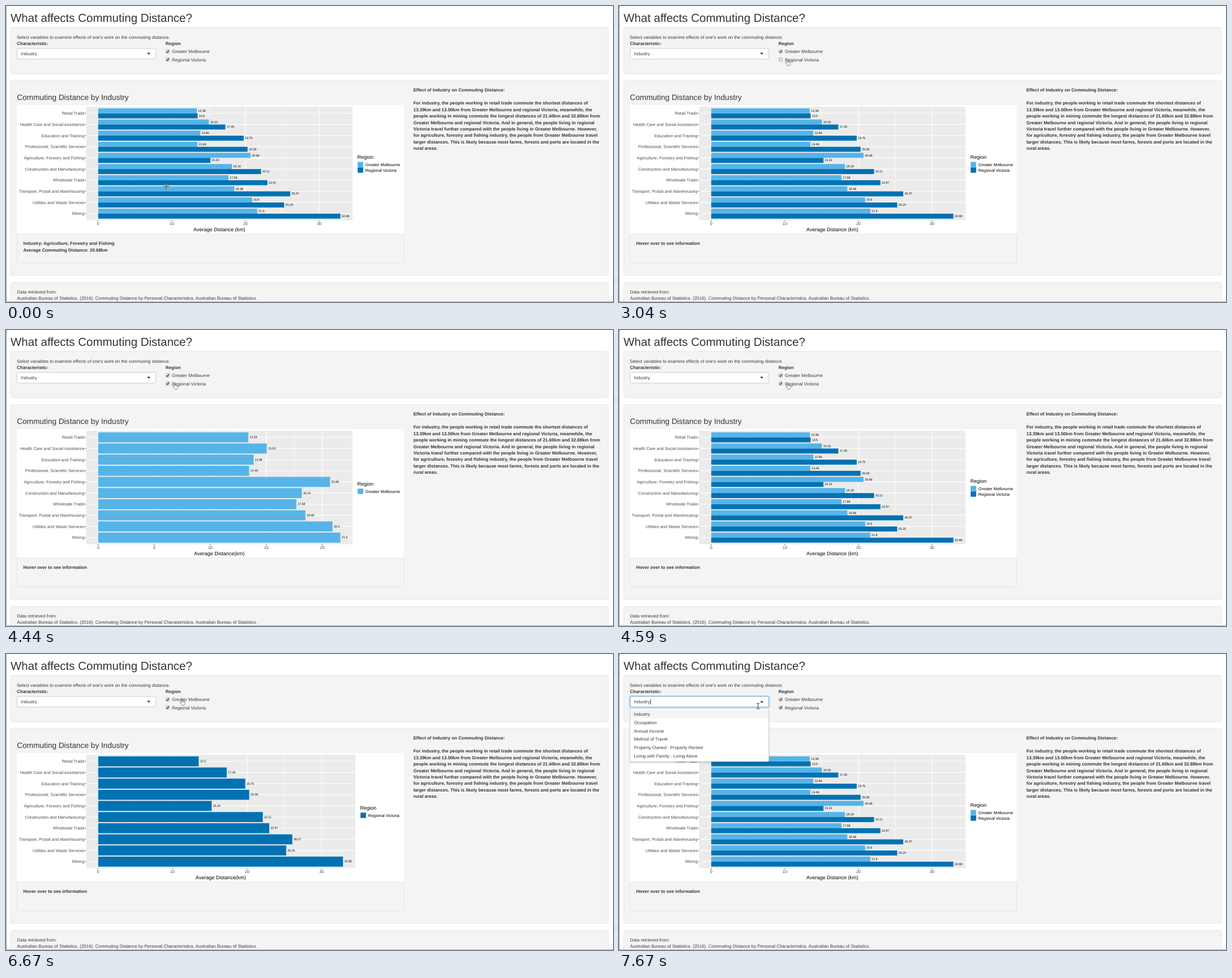
Write an HTML page that moves like this. It is 1072 by 523 pixels and loops after 8 s.

```html
<!DOCTYPE html>
<html lang="en">
<head>
<meta charset="utf-8">
<title>Commuting Distance</title>
<style>
  html, body { margin: 0; width: 100%; height: 100%; overflow: hidden; background: #fff; }
  svg { display: block; width: 1072px; height: 523px; }
  text { font-family: "Liberation Sans", Arial, sans-serif; text-rendering: geometricPrecision; white-space: pre; }
  .cross { mix-blend-mode: difference; }
</style>
</head>
<body>
<svg id="stage" viewBox="0 0 1072 523"></svg>
<script>
const LOOP = 8000;
const BODY = 7.95, LINE = 11.42;
const INK = '#3a3a3a', AXIS = '#4d4d4d';
const LIGHT = '#56b4e9', DARK = '#0072b2';

const industries = ['Retail Trade', 'Health Care and Social Assistance', 'Education and Training',
  'Professional, Scientific Services', 'Agriculture, Forestry and Fishing', 'Construction and Manufacturing',
  'Wholesale Trade', 'Transport, Postal and Warehousing', 'Utilities and Waste Services', 'Mining'];
const melbourne = { name: 'Greater Melbourne', color: LIGHT,
  km: [13.39, 15.03, 13.86, 13.46, 20.68, 18.16, 17.68, 18.48, 20.9, 21.6] };
const victoria = { name: 'Regional Victoria', color: DARK,
  km: [13.5, 17.26, 19.75, 20.28, 15.24, 22.11, 22.97, 26.07, 25.25, 32.88] };

const charts = {
  both: { series: [melbourne, victoria], unit: 13.01, step: 10, right: 612, title: 'Average Distance (km)' },
  melbourne: { series: [melbourne], unit: 19.8, step: 5, right: 612, title: 'Average Distance(km)' },
  victoria: { series: [victoria], unit: 13.15, step: 10, right: 617, title: 'Average Distance(km)' }
};

const paragraph = [
  'For industry, the people working in retail trade commute the shortest distances of',
  '13.39km and 13.50km from Greater Melbourne and regional Victoria, meanwhile, the',
  'people working in mining commute the longest distances of 21.60km and 32.88km from',
  'Greater Melbourne and regional Victoria. And in general, the people living in regional',
  'Victoria travel further compared with the people living in Greater Melbourne. However,',
  'for agriculture, forestry and fishing industry, the people from Greater Melbourne travel',
  'larger distances. This is likely because most farms, forests and ports are located in the',
  'rural areas.'];
const options = ['Industry', 'Occupation', 'Annual Income', 'Method of Travel',
  'Property Owned : Property Rented', 'Living with Family : Living Alone'];

const hover = (industry, km) => ['Industry: ' + industry, `Average Commuting Distance: ${km}km`];

// Each track lists [start time, value...]; a value holds until the next entry.
const tracks = {
  cursor: [
    [0, 'cross', 283, 319], [280, 'cross', 284, 325], [580, 'cross', 285, 327], [960, 'cross', 286, 329],
    [1110, 'cross', 287, 329], [1690, 'cross', 288, 315], [1810, 'cross', 289, 301], [1970, 'cross', 290, 237],
    [2120, 'arrow', 291, 168], [2240, 'arrow', 292, 134], [2360, 'arrow', 293, 112],
    [2510, 'hand', 293, 93], [4290, 'hand', 293.6, 92.4], [4720, 'hand', 303, 83], [5020, 'hand', 306.5, 78.3],
    [6950, 'hand', 304, 79], [7100, 'arrow', 290, 86], [7250, 'arrow', 268, 93], [7380, 'beam', 245.7, 92]],
  info: [
    [0, hover(industries[4], 20.68)], [120, hover(industries[7], 18.48)], [1230, hover(industries[7], 26.07)],
    [2240, ['Hover over to see information']]],
  chart: [[0, 'both'], [3330, 'melbourne'], [4590, 'both'], [5730, 'victoria'], [6950, 'both']],
  melbourneOn: [[0, true], [5580, false], [6670, true]],
  victoriaOn: [[0, true], [3040, false], [4440, true]],
  open: [[0, false], [7670, true]]
};
const indexAt = (track, t) => track.findLastIndex(entry => entry[0] <= t);

const text = (x, y, str, size = BODY, fill = INK, extra = '') =>
  `<text x="${x}" y="${y}" font-size="${size}" fill="${fill}" ${extra}>${str}</text>`;
const bold = (x, y, str) => text(x, y, str, BODY, '#333', 'font-weight="700"');
const rect = (x, y, w, h, fill, extra = '') =>
  `<rect x="${x}" y="${y}" width="${w}" height="${h}" fill="${fill}" ${extra}/>`;
const line = (x1, y1, x2, y2, stroke, width) =>
  `<path d="M${x1} ${y1}L${x2} ${y2}" stroke="${stroke}" stroke-width="${width}"/>`;
const well = (x, y, w, h) => rect(x, y, w, h, '#f4f4f4', 'stroke="#e3e3e3" rx="2"');

function page() {
  return rect(0, 0, 1072, 523, '#fff')
    + text(8, 28, 'What affects Commuting Distance?', 20.5, '#333')
    + well(8.5, 38, 1055, 81.5) + well(8.5, 132, 1055, 344) + well(8.5, 488.5, 1055, 60)
    + text(19, 57.8, "Select variables to examine effects of one's work on the commuting distance.")
    + bold(19.3, 69.2, 'Characteristic:') + bold(281.8, 69.2, 'Region')
    + text(19.3, 166, 'Commuting Distance by Industry', 13.66, '#333')
    + bold(719.5, 151.4, 'Effect of Industry on Commuting Distance:')
    + paragraph.map((row, i) => bold(719.5, 174.3 + i * LINE, row)).join('')
    + well(19.5, 402.8, 683, 50.7)
    + text(19.5, 508.2, 'Data retrieved from:')
    + text(19.5, 519.4, 'Australian Bureau of Statistics. (2016). Commuting Distance by Personal Characteristics. Australian Bureau of Statistics.', 7.97)
    + line(0.5, 0, 0.5, 523, '#a0a0a0', 1) + line(0, 522.5, 1072, 522.5, '#b0b0b0', 1);
}

function checkbox(y, on, label) {
  return rect(282.5, y, 6, 6, on ? '#f0f0f0' : '#e4e4e4', 'stroke="#959595" stroke-width=".8" rx="1"')
    + (on ? `<path d="M283.8 ${y + 3}l1.4 1.6 2.3-3.6" fill="none" stroke="#222" stroke-width="1.3"/>` : '')
    + text(293, y + 5.9, label);
}

function plot({ series, unit, step, right, title }) {
  const left = 141.5, top = 178, bottom = 378.5, pitch = 19.68;
  const xAt = km => 162.8 + km * unit;
  const yAt = i => 189.7 + i * pitch;
  let out = rect(19.5, 175, 682.8, 227.3, '#fff') + rect(left, top, right - left, bottom - top, '#ebebeb');

  for (let km = 0; xAt(km) < right; km += step / 2) {
    const major = km % step === 0, x = xAt(km);
    out += line(x, top, x, bottom, '#fff', major ? 1.1 : 0.6);
    if (major) out += line(x, bottom, x, bottom + 2, '#333', 0.9)
      + text(x, 387.4, km, 7.4, AXIS, 'text-anchor="middle"');
  }
  industries.forEach((name, i) => {
    out += line(left, yAt(i), right, yAt(i), '#fff', 1.1) + line(left - 2, yAt(i), left, yAt(i), '#333', 0.9)
      + text(138.6, yAt(i) + 2.6, name, 7.42, AXIS, 'text-anchor="end"');
  });

  const height = pitch * 0.9 / series.length;
  series.forEach(({ km, color }, s) => km.forEach((value, i) => {
    const y = yAt(i) - pitch * 0.45 + s * height;
    out += rect(xAt(0), y, value * unit, height, color)
      + text(xAt(value) + 2.3, y + height / 2 + 1.6, value, 5.3, '#000');
  }));

  const keyX = right + 9, firstY = 285 - 4.9 * series.length;
  out += text((left + right) / 2, 397.7, title, 9, '#000', 'text-anchor="middle"')
    + text(keyX - 0.5, firstY - 5.3, 'Region', 9, '#000');
  series.forEach(({ name, color }, s) => {
    const y = firstY + s * 9.8;
    out += rect(keyX, y + 0.2, 9.8, 9.4, color)
      + text(keyX + 13.8, y + 7.5, name, 7.3, '#000');
  });
  return out;
}

function selectBox(open) {
  const glow = open ? rect(18.5, 74, 247, 21, 'none', 'stroke="#66afe9" stroke-opacity=".35" stroke-width="2" rx="3"') : '';
  return glow + rect(19.5, 75, 245, 18.8, '#fff', `stroke="${open ? '#66afe9' : '#ccc'}" rx="2"`)
    + text(26.5, 87.2, 'Industry')
    + `<path d="${open ? 'M249.2 85.6h5.8l-2.9-3z' : 'M249.2 82.8h5.8l-2.9 3z'}" fill="#222"/>`
    + (open ? line(55.8, 80, 55.8, 89, '#222', 0.9) : '');
}

function dropdown() {
  const shadow = [4, 3, 2, 1].map(d => rect(19.5 - d / 3, 100, 245 + d / 1.5, 90 + d, '#000', 'fill-opacity=".04" rx="2"')).join('');
  return shadow + rect(19.5, 96, 245, 94, '#fff', 'stroke="#d0d0d0" rx="2"')
    + rect(20, 98.8, 244, 14.6, '#f4f4f4')
    + options.map((name, i) => text(26.5, 108.9 + i * 14.8, name)).join('');
}

const cursors = {
  cross: '<path class="cross" d="M-5.5 0H5.5M0-5.5V5.5" stroke="#fff" stroke-width="1.1"/>',
  arrow: '<path d="M0 0V9.4L2.2 7.4 3.7 10.7 5.2 10 3.8 6.9H6.8Z" fill="#fff" stroke="#222" stroke-width=".6"/>',
  hand: `<g transform="scale(.567)" stroke="#333" stroke-width="1" stroke-linejoin="round">
    <path d="M6 14V2.5Q6 1 7.4 1T8.8 2.5V8Q11.3 6.8 11.6 8.9 14 7.9 14.3 10 16.9 9.2 17 11.5V15Q17 18 15 20V21.5H7.5V20L2 13.5Q1 12 2.3 11.4T4.6 12.4Z" fill="#fff"/>
    <path d="M8.8 8v3.5M11.6 9v3M14.3 10v2.5" fill="none"/></g>`,
  beam: '<path d="M-2.6-4.8H-.6L0-4.3 .6-4.8H2.6M0-4.3V4.3M-2.6 4.8H-.6L0 4.3 .6 4.8H2.6" fill="none" stroke="#222" stroke-width=".9"/>'
};

const stage = document.getElementById('stage');
const base = page();
let shown = '';

function frame(now) {
  const t = now % LOOP;
  const indices = Object.values(tracks).map(track => indexAt(track, t));
  const key = indices.join();
  if (key !== shown) {
    shown = key;
    const state = {};
    Object.keys(tracks).forEach((name, i) => { state[name] = tracks[name][indices[i]].slice(1); });
    const [shape, x, y] = state.cursor;
    const [open] = state.open;
    stage.innerHTML = base + plot(charts[state.chart[0]])
      + state.info[0].map((row, i) => bold(30.5, 422.4 + i * LINE, row)).join('')
      + checkbox(77.4, state.melbourneOn[0], melbourne.name)
      + checkbox(91.6, state.victoriaOn[0], victoria.name)
      + selectBox(open) + (open ? dropdown() : '')
      + `<g transform="translate(${x} ${y})">${cursors[shape]}</g>`;
  }
  requestAnimationFrame(frame);
}
frame(performance.now());
</script>
</body>
</html>
```
